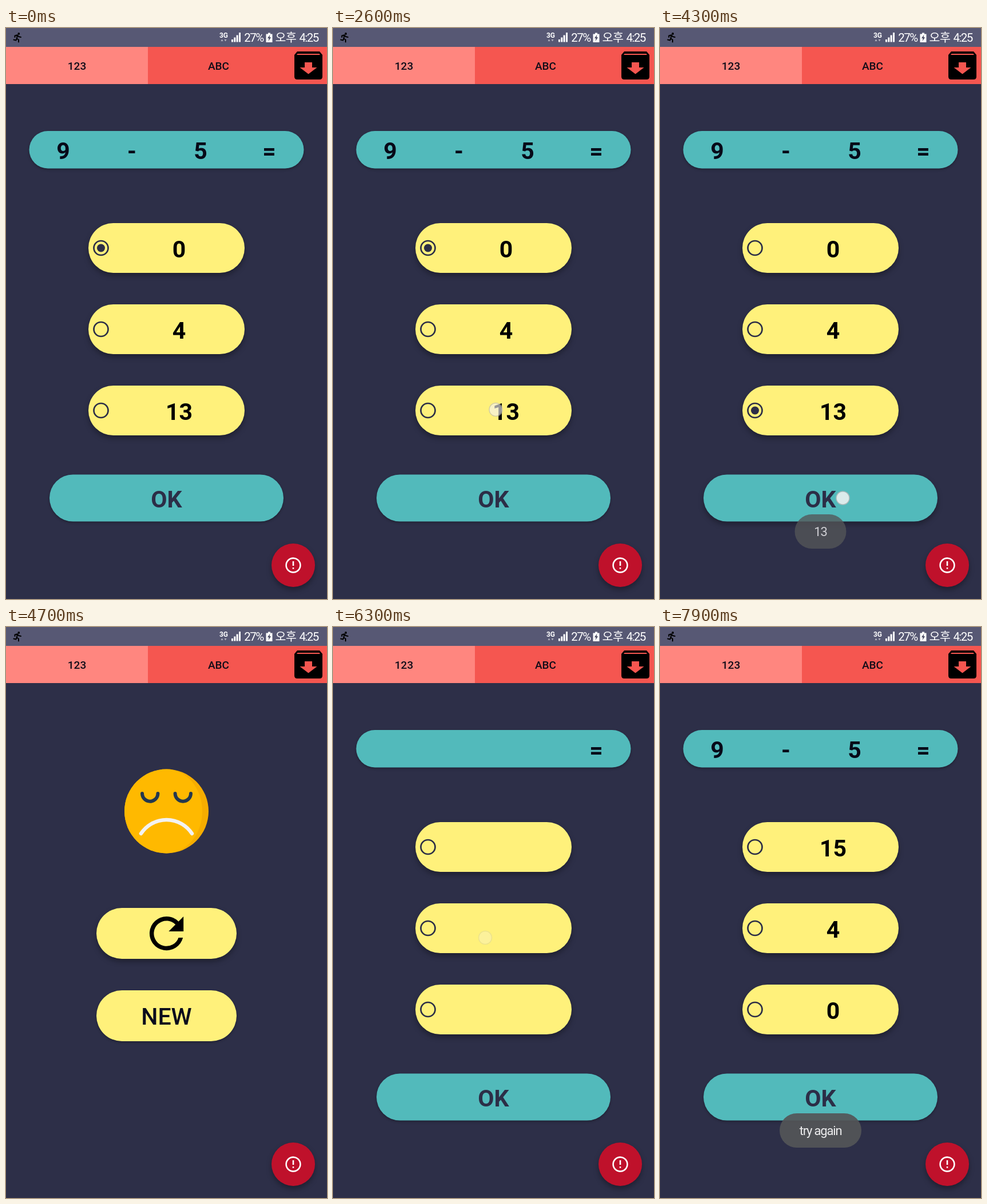
An HTML page that plays this animation: 561x998 px, repeating every 8000 ms.

```html
<!DOCTYPE html>
<html lang="ko">
<head>
<meta charset="utf-8">
<style>
html, body { margin: 0; width: 100%; height: 100%; overflow: hidden; background: #2d2f48; }
svg { display: block; width: 100vw; height: 100vh; }
text { font-family: Roboto, "Noto Sans CJK KR", "Noto Sans CJK", sans-serif; text-anchor: middle; }
.tab { font-size: 19px; font-weight: 500; fill: #100c18; }
.big { font-size: 41px; font-weight: 700; }
.sum { fill: #070918; }
.teal { fill: #52babb; }
.yellow { fill: #fff17b; }
.low { filter: drop-shadow(0 2px 2px rgba(0,0,0,.3)); }
.high { filter: drop-shadow(0 5px 5px rgba(0,0,0,.32)); }
.line { fill: none; stroke-linecap: round; stroke-linejoin: round; }
.bar { font-size: 20.5px; fill: #fff; }
.tight { letter-spacing: -1.6px; }
</style>
</head>
<body>
<svg viewBox="0 0 561 998" preserveAspectRatio="none">
  <rect width="561" height="998" fill="#2d2f48"/>

  <!-- status bar -->
  <rect width="561" height="33" fill="#575874"/>
  <circle cx="22.3" cy="10" r="1.9"/>
  <path class="line" stroke="#000" stroke-width="2" d="M15.5 16V13.5L20 12.3L22 15L26 16M20 12.5L18.8 18.5L22 20.5V24.5M18.8 18L17.5 21.5L13.5 20.6"/>
  <text x="380.5" y="17" fill="#fff" font-size="12" font-weight="700">3G</text>
  <path fill="#fff" opacity=".55" d="M375.5 23l2-3.5l2 3.5zM381.5 20h4l-2 3.5z"/>
  <path fill="#fff" d="M394 20h3v4.500h-3zM398.300 16.500h3v8h-3zM402.600 12.500h3v12h-3zM407 8h3v16.500h-3z"/>
  <text class="bar tight" x="433" y="24">27%</text>
  <path fill="#fff" d="M458 8.500h4v2h3.500v14.500h-11v-14.500h3.500z"/>
  <path fill="#45465f" d="M461.500 11.500l-4.500 6.500h2.600l-1 5l4.600-6.800h-2.700z"/>
  <text class="bar" x="489" y="24" font-size="20" letter-spacing="-.4">오후</text>
  <text class="bar tight" x="529" y="24">4:25</text>

  <!-- tabs -->
  <rect y="33" width="248" height="65" fill="#ff867f"/>
  <rect x="248" y="33" width="313" height="65" fill="#f55650"/>
  <text class="tab" x="124" y="73">123</text>
  <text class="tab" x="371.500" y="73">ABC</text>
  <path d="M509 41h39l5 6v38q0 5-5 5h-39q-5 0-5-5v-38z"/>
  <path fill="#f55650" d="M509.500 45h38l1.500 2h-41zM522 60h13v9h8.500l-15 11.500l-15-11.500h8.500z"/>

  <g id="quiz"></g>

  <g id="result">
    <circle cx="280.500" cy="322" r="73.500" fill="#f6ad00"/>
    <path fill="#ffb900" d="M280.500 248.500a73.500 73.500 0 0 0 0 147a62.500 73.500 0 0 0 0-147"/>
    <path class="line" stroke="#24384e" stroke-width="6" d="M238 291a13.700 13.700 0 0 0 27.400 0M295.600 291a13.700 13.700 0 0 0 27.400 0"/>
    <path class="line" stroke="#f3f2f2" stroke-width="6.500" d="M236 361a53.200 53.200 0 0 1 89 0"/>
    <rect class="yellow high" x="158" y="491" width="245" height="89" rx="44.500"/>
    <path transform="translate(236.200 491.200) scale(3.700)" d="M17.650 6.350A7.960 7.960 0 0 0 12 4a8 8 0 1 0 7.730 10h-2.080A6 6 0 1 1 12 6c1.660 0 3.140.690 4.220 1.780L13 11h7V4z"/>
    <rect class="yellow low" x="158" y="635" width="245" height="89" rx="44.500"/>
    <text x="280.500" y="695" font-size="41" font-weight="500" fill="#0a0c1c">NEW</text>
  </g>

  <!-- floating button -->
  <circle class="high" cx="502" cy="939" r="38" fill="#bf112b"/>
  <circle cx="502" cy="939" r="12.400" fill="none" stroke="#fff" stroke-width="2.600"/>
  <path fill="#fff" d="M500.700 932h2.600v8h-2.600zM500.700 943h2.600v2.600h-2.600z"/>

  <g id="toast">
    <rect y="850" height="60" rx="30" fill="#545658" opacity=".96"/>
    <text x="280.500" y="888" font-size="22" letter-spacing="-1.200" fill="#f4f4f4"></text>
  </g>
  <circle id="touch" r="11.500" fill="#f4f4f4" stroke="#b9b9b9" stroke-width="1.500"/>
</svg>
<script>
const $ = id => document.getElementById(id);
const label = (x, y, cls) => `<text class="big ${cls}" x="${x}" y="${y}"></text>`;
const option = y => `
  <rect class="yellow high" x="144" y="${y}" width="273" height="87" rx="43.5"/>
  <circle cx="166" cy="${y + 43.5}" r="12.5" fill="none" stroke="#2c2e47" stroke-width="2.7"/>
  <circle class="dot" cx="166" cy="${y + 43.5}" r="7" fill="#2c2e47"/>
  ${label(302.5, y + 60, 'answer')}`;

$('quiz').innerHTML = `
  <rect class="teal low" x="40.500" y="180" width="480" height="65.500" rx="32.750"/>
  ${[100, 220, 340, 460].map(x => label(x, 229, 'sum')).join('')}
  ${[341, 483, 625].map(option).join('')}
  <rect id="ok" class="teal" x="76" y="780.500" width="409" height="82" rx="41"/>
  <text class="big" x="280.500" y="838" fill="#2c2e47">OK</text>`;

const sums = document.querySelectorAll('.sum');
const answers = document.querySelectorAll('.answer');
const dots = document.querySelectorAll('.dot');
const [toastBox, toastText] = $('toast').children;

const taps = [
  { at: 2600, x: 284.5, y: 667, alpha: .62 },
  { at: 4300, x: 319.5, y: 821.5, alpha: .85 },
  { at: 6100, x: 266, y: 543, alpha: .75 }
];
const fill = (nodes, words) => nodes.forEach((n, i) => n.textContent = words[i]);
const show = (node, on) => node.style.display = on ? '' : 'none';
const ramp = (t, a, b) => Math.min(1, Math.max(0, (t - a) / (b - a)));

function draw(t) {
  const failed = t >= 4500 && t < 6300;
  const fresh = t >= 6300;
  const blank = fresh && t < 6400;
  show($('quiz'), !failed);
  show($('result'), failed);
  fill(sums, blank ? ['', '', '', '='] : ['9', '-', '5', '=']);
  fill(answers, blank ? ['', '', ''] : fresh ? ['15', '4', '0'] : ['0', '4', '13']);
  const picked = fresh ? -1 : t < 2800 ? 0 : 2;
  dots.forEach((d, i) => show(d, i === picked));
  $('ok').setAttribute('class', t >= 4300 && t < 4500 ? 'teal high' : 'teal low');

  const half = fresh ? 71.5 : 45;
  toastBox.setAttribute('x', 280.5 - half);
  toastBox.setAttribute('width', half * 2);
  toastText.textContent = fresh ? 'try again' : '13';
  $('toast').style.opacity = fresh
    ? ramp(t, 6400, 6900) * (1 - .4 * ramp(t, 7700, 8300) ** 2)
    : ramp(t, 2800, 3400) * (1 - ramp(t, 4000, 4700) ** 2);

  const tap = taps.find(p => t >= p.at && t < p.at + 300);
  show($('touch'), tap);
  if (tap) {
    $('touch').setAttribute('cx', tap.x);
    $('touch').setAttribute('cy', tap.y);
    $('touch').style.opacity = tap.alpha * (t - tap.at < 200 ? 1 : .35);
  }
}

const start = performance.now();
function tick() {
  // the screen refreshes ten times a second
  draw(Math.floor((performance.now() - start) % 8000 / 100) * 100);
  requestAnimationFrame(tick);
}
tick();
</script>
</body>
</html>
```
